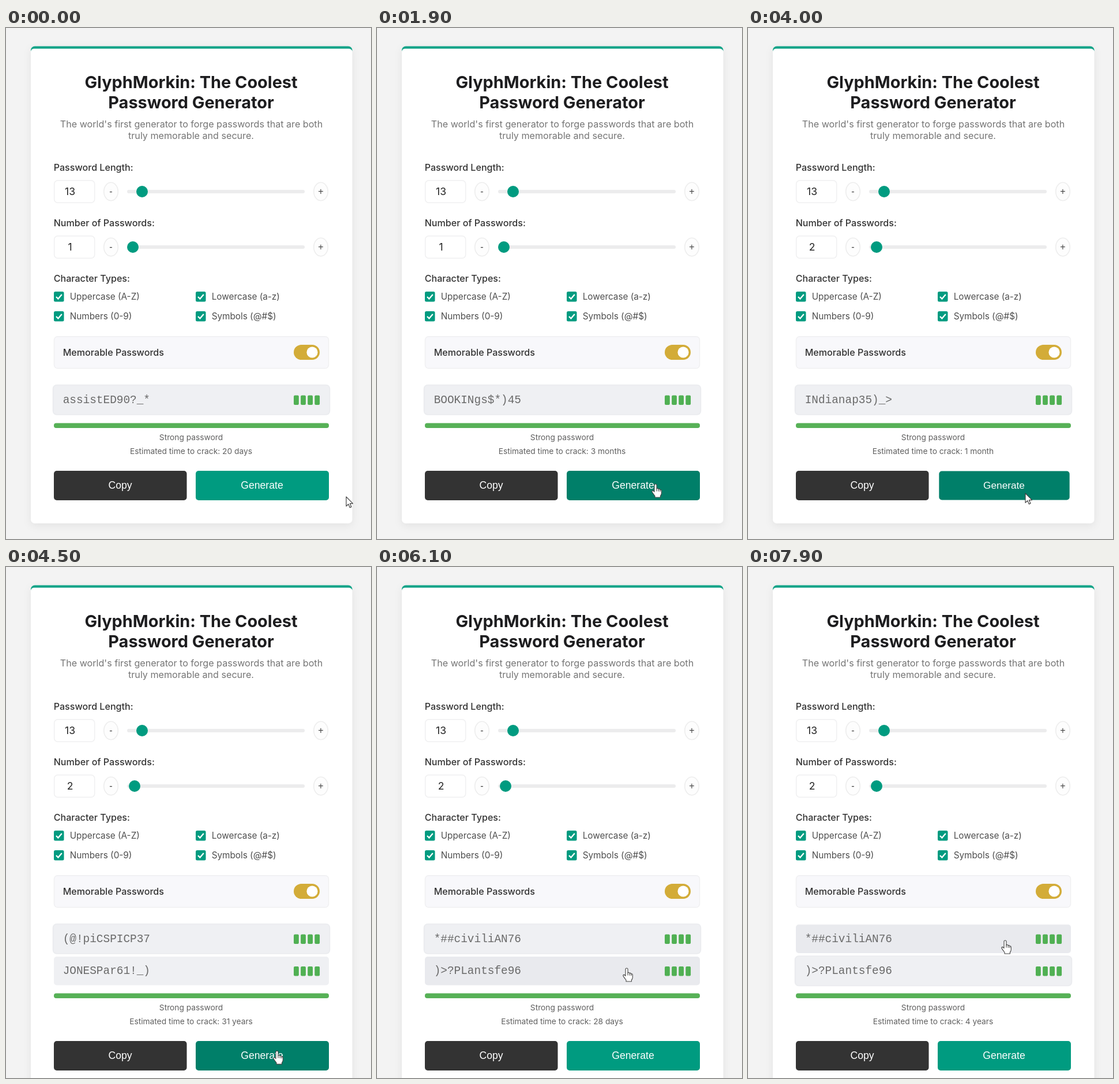
Write an HTML page that moves like this. It is 633x884 px and loops after 8000 ms.

```html
<!DOCTYPE html>
<html lang="en">
<head>
<meta charset="utf-8">
<title>Password Generator</title>
<style>
html, body { margin: 0; width: 100%; height: 100%; overflow: hidden; background: #f3f3f3; }
svg { display: block; width: 633px; height: 884px; font-family: Inter, sans-serif; }
.title { font-size: 28.9px; font-weight: 700; fill: #1d1d1f; }
.sub { font-size: 16.13px; fill: #757575; }
.label { font-size: 16.1px; font-weight: 500; fill: #333; }
.option { font-size: 15.3px; fill: #4e4e4e; }
.note { font-size: 13.75px; fill: #606060; }
.field { font-size: 17.6px; fill: #222; }
.step { font: 16px "Liberation Sans", Arial, sans-serif; fill: #444; }
.btn { font: 17.6px "Liberation Sans", Arial, sans-serif; fill: #fff; }
.pass { font: 19.4px "Courier New", "Liberation Mono", monospace; fill: #6a6a6a; white-space: pre; }
.mid { text-anchor: middle; }
#card { filter: drop-shadow(0 4px 7px rgba(0, 0, 0, .065)); }
</style>
</head>
<body>
<svg id="stage" viewBox="0 0 633 884" xmlns="http://www.w3.org/2000/svg"></svg>
<script>
const LOOP = 8000, STEP = 100, SHIFT = 54;
const TEAL = '#009b80', GREEN = '#57b157';

const rect = (x, y, w, h, r, fill, extra = '') =>
  `<rect x="${x}" y="${y}" width="${w}" height="${h}" rx="${r}" fill="${fill}" ${extra}/>`;
const text = (x, y, cls, str, id = '') =>
  `<text x="${x}" y="${y}" class="${cls}" ${id && `id="${id}"`}>${str}</text>`;

const stepper = (x, y, sign) =>
  `<ellipse cx="${x}" cy="${y}" rx="12.3" ry="15.7" fill="#fdfdfd" stroke="#ededed" stroke-width="1.6"/>` +
  text(x, y + 5, 'step mid', sign);

const slider = (y, name, thumbX) =>
  rect(83.7, y - 19.3, 70, 38.6, 6, '#fff', 'stroke="#f0f0f1" stroke-width="1.6"') +
  text(111, y + 5.5, 'field mid', name === 'length' ? '13' : '1', name) +
  stepper(182, y, '-') + stepper(546, y, '+') +
  rect(210, y - 3, 308, 6, 3, '#ececed') +
  `<circle id="${name}Thumb" cx="${thumbX}" cy="${y}" r="10" fill="${TEAL}"/>`;

const option = (x, y, str) =>
  rect(x, y - 8.5, 17.5, 17.5, 2.5, TEAL) +
  `<path d="M${x + 4} ${y + .5}l3.4 3.5 6.4-7.5" fill="none" stroke="#fff" stroke-width="2.3"/>` +
  text(x + 27.7, y + 5.7, 'option', str);

const row = (i, y) => {
  let bars = '';
  for (let k = 0; k < 4; k++) bars += rect(499 + k * 12.1, y + 17, 8.8, 16.5, 2, '#50b053');
  return `<g id="row${i}">` +
    rect(82, y - .5, 479, 50.5, 6, 'none', `id="ring${i}" stroke="#ebecef" stroke-width="2.6"`) +
    rect(83, y, 477, 49.5, 5, '#eff0f3', `id="fill${i}"`) +
    text(98.7, y + 30, 'pass', '', 'pass' + i) + bars + '</g>';
};

document.getElementById('stage').innerHTML =
  rect(0, 0, 633, 884, 0, '#f3f3f3') +
  `<clipPath id="round">${rect(43, 31.5, 557.5, 825.5, 7, '#fff', 'id="clip"')}</clipPath>` +
  rect(43, 31.5, 557.5, 825.5, 7, '#fff', 'id="card"') +
  `<path clip-path="url(#round)" d="M43 31H601V40.5Q599 35.7 594 35.7H49Q44 35.7 43 40.5Z" fill="#14a388"/>` +
  text(321, 104, 'title mid', 'GlyphMorkin: The Coolest') +
  text(321, 139, 'title mid', 'Password Generator') +
  text(321.5, 172, 'sub mid', "The world's first generator to forge passwords that are both") +
  text(321, 192, 'sub mid', 'truly memorable and secure.') +
  text(82.7, 247, 'label', 'Password Length:') + slider(283, 'length', 236) +
  text(82.7, 343, 'label', 'Number of Passwords:') + slider(379, 'count', 220) +
  text(82.7, 439, 'label', 'Character Types:') +
  option(83, 464.5, 'Uppercase (A-Z)') + option(329, 464.5, 'Lowercase (a-z)') +
  option(83, 498.5, 'Numbers (0-9)') + option(329, 498.5, 'Symbols (@#$)') +
  rect(83.5, 533.7, 476, 55, 6, '#f8f8fb', 'stroke="#f0f0f2" stroke-width="1.6"') +
  text(98.7, 567, 'label', 'Memorable Passwords') +
  rect(499, 548, 45, 26, 13, '#d3ac38') +
  '<circle cx="531" cy="561" r="9.6" fill="#fff"/>' +
  row(0, 618.5) + row(1, 674) +
  '<g id="lower">' +
  rect(83, 683.5, 477, 8.5, 4, GREEN) +
  text(321, 713, 'note mid', 'Strong password') +
  text(321, 737, 'note mid', '', 'crack') +
  rect(83, 766, 230.5, 51, 5, '#333') + text(198, 797, 'btn mid', 'Copy') +
  '<g id="gen">' + rect(329, 766, 231, 51, 5, TEAL, 'id="genFill"') +
  text(444, 797, 'btn mid', 'Generate') + '</g></g>' +
  `<path id="arrow" d="M0 0V16.2L3.8 12.7 6.3 18.6 9 17.4 6.5 11.7H11.5Z"
    fill="#fff" stroke="#444" stroke-width="1.2" stroke-linejoin="round"/>` +
  `<g id="hand" stroke="#444" stroke-width="1.1" stroke-linejoin="round" stroke-linecap="round">
    <path fill="#fff" d="M-2 2Q-2 0 0 0T2 2V8Q3.4 6.6 5.2 8.6 6.8 7.8 8 9.8 10.3 9.4 10.3 12V16Q10 19 8.4 20.5V23H-1V20.5
      Q-3.5 17.5-6 13.6-6.6 11.6-4.8 11.4-3.4 11.4-2 13.4Z"/>
    <path fill="none" d="M2 8V12M5.2 8.8V12.3M8 10V12.6"/></g>`;

const el = id => document.getElementById(id);
const show = (id, on) => el(id).setAttribute('display', on ? 'inline' : 'none');
const set = (id, attr, v) => el(id).setAttribute(attr, v);

// Time, passwords shown from then on
const RESULTS = [
  [0, 'assistED90?_*'],
  [800, 'BOOKINgs$*)45'],
  [2200, 'INdianap35)_>'],
  [4100, '(@!piCSPICP37', 'JONESPar61!_)'],
  [5300, '*##civiliAN76', ')>?PLantsfe96']
];
const CRACK = [[0, '20 days'], [800, '3 months'], [2200, '1 month'], [4100, '31 years'],
  [5300, '28 days'], [6500, '4 years']];
const PRESSES = [[700, 800], [2100, 2200], [3900, 4100], [5100, 5300]];
const PATH = [[0, 590, 811], [100, 590, 811], [700, 483, 789], [2300, 483, 789], [2900, 516, 403],
  [3200, 543, 376], [3400, 543, 376], [3900, 481, 805], [4200, 481, 805], [4600, 468, 843],
  [5400, 468, 843], [6000, 433, 694], [6600, 433, 694], [7300, 446, 646], [LOOP, 446, 646]];

const latest = (list, t) => list.filter(e => e[0] <= t).pop();
const inside = (p, x, y, w, h) => p[0] >= x && p[0] <= x + w && p[1] >= y && p[1] <= y + h;

function pointer(t) {
  const i = PATH.findIndex(k => k[0] > t), a = PATH[i - 1], b = PATH[i];
  const u = (t - a[0]) / (b[0] - a[0]), e = u * u * (3 - 2 * u);
  return [a[1] + (b[1] - a[1]) * e, a[2] + (b[2] - a[2]) * e];
}

function draw(t) {
  const words = latest(RESULTS, t).slice(1);
  const two = words.length > 1, dy = two ? SHIFT : 0;
  const p = pointer(t);
  const picked = t >= 6500 ? 1 : 0;

  set('lower', 'transform', `translate(0 ${dy})`);
  set('card', 'height', 825.5 + dy);
  set('clip', 'height', 825.5 + dy);
  show('row1', two);
  const overRow = [0, 1].map(i => (i === 0 || two) && inside(p, 83, i ? 674 : 618.5, 477, 49.5));
  for (let i = 0; i < 2; i++) {
    el('pass' + i).textContent = words[i] || '';
    show('ring' + i, i === picked);
    set('fill' + i, 'fill', overRow[i] ? '#e9eaee' : '#eff0f3');
  }
  el('crack').textContent = 'Estimated time to crack: ' + latest(CRACK, t)[1];

  const count = t >= 3300 ? 2 : 1;
  el('count').textContent = count;
  set('countThumb', 'cx', 217 + 3 * count);

  const overGen = inside(p, 329, 766 + dy, 231, 51);
  const pressed = PRESSES.some(([a, b]) => t >= a && t < b);
  set('genFill', 'fill', overGen ? '#007f69' : TEAL);
  set('gen', 'transform', pressed ? 'translate(444.5 791.5) scale(.98) translate(-444.5 -791.5)' : '');

  const overPlus = inside(p, 533, 363, 26, 32);
  const moving = t >= 3500 && t < 4400;
  const hand = !moving && (overGen || overPlus || overRow[0] || overRow[1]);
  show('hand', hand);
  show('arrow', !hand);
  set(hand ? 'hand' : 'arrow', 'transform', `translate(${p[0].toFixed(1)} ${p[1].toFixed(1)})`);
}

const start = performance.now();
function tick() {
  const t = (performance.now() - start) % LOOP;
  draw(Math.floor(t / STEP) * STEP);
  requestAnimationFrame(tick);
}
draw(0);
requestAnimationFrame(tick);
</script>
</body>
</html>
```
